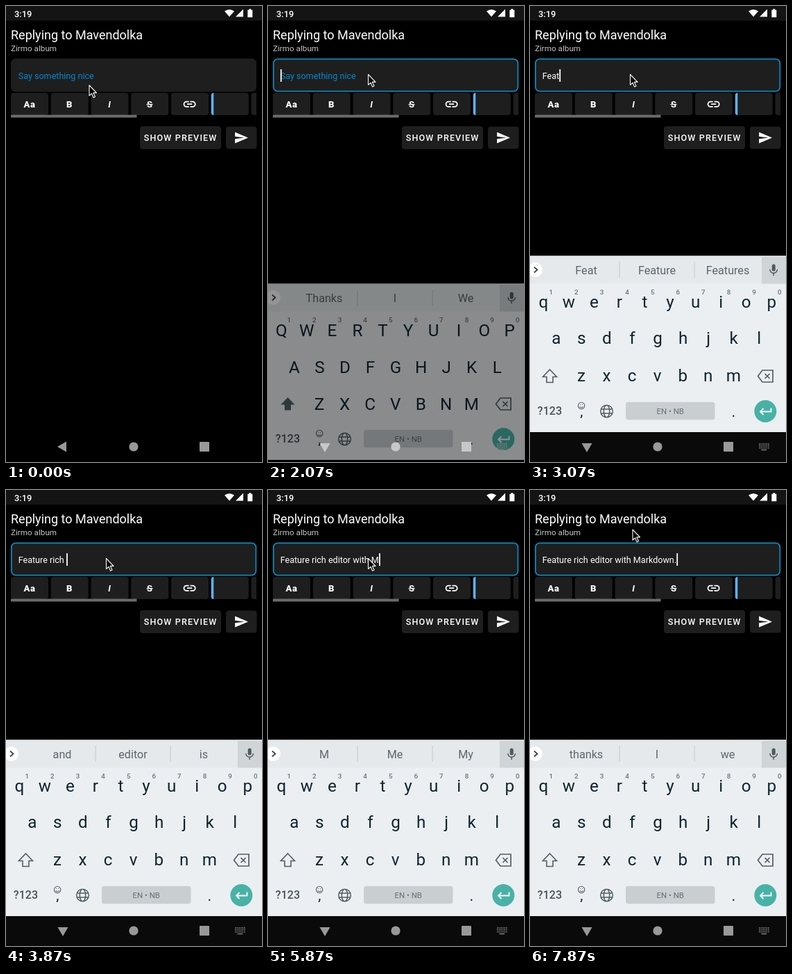
Animation of 369 by 656 pixels, one loop 8000 ms. Source, as an HTML page with a canvas:

```html
<!DOCTYPE html>
<html lang="en">
<head>
<meta charset="utf-8">
<title>Reply editor</title>
<style>
  html, body { margin: 0; width: 100%; height: 100%; overflow: hidden; background: #000; }
  canvas { display: block; width: 369px; height: 656px; }
</style>
</head>
<body>
<canvas id="stage"></canvas>
<script>
const W = 369, H = 656, LOOP = 8000;
const canvas = document.getElementById('stage');
const ctx = canvas.getContext('2d');
const dpr = window.devicePixelRatio || 1;
canvas.width = Math.round(W * dpr);
canvas.height = Math.round(H * dpr);

const FULL = 'Feature rich editor with Markdown.';
// [time, typed characters, suggestions]
const TYPING = [
  [0, 0, 'Thanks|I|We'], [2670, 1, 'Thanks|I|We'], [2730, 1, 'F|For|From'],
  [2870, 2, 'Fe|Few|Feel'], [2930, 3, 'Fea|Fear|Feature'], [3000, 4, 'Feat|Feature|Features'],
  [3130, 5, 'Featu|Feature|Features'], [3200, 6, 'Featur|Feature|Features'],
  [3270, 7, 'Feature|Features|Featured'], [3330, 8, 'is|and|of'],
  [3470, 9, 'r|rich|right'], [3530, 10, 'ri|right|rich'], [3670, 11, 'ric|rich|Richard'],
  [3730, 12, 'rich|rich|riches'], [3870, 13, 'and|editor|is'],
  [4330, 14, 'e|editor|et'], [4530, 15, 'ed|editor|Ed'], [4670, 16, 'edi|editor|edit'],
  [4730, 17, 'edit|editor|editing'], [4870, 18, 'edito|editor|editors'],
  [5000, 19, 'editor|editors|editorial'], [5070, 20, 'and|of|for'],
  [5270, 21, 'w|with|we'], [5330, 22, 'wi|with|wit'], [5470, 23, 'wit|with|without'],
  [5530, 24, 'wit|with|without'], [5600, 24, 'with|within|without'], [5670, 25, 'a|the|my'],
  [5870, 26, 'M|Me|My'], [6000, 27, 'Ma|May|Man'], [6130, 28, 'Mar|Mark|Mary'],
  [6270, 29, 'Mar|Mark|Mary'], [6330, 29, 'Mark|Marks|Market'],
  [6470, 30, 'Markd|Markdown|Markdowns'], [6600, 31, 'Markdo|Markdown|Markdowns'],
  [6800, 32, 'Markdow|Markdown|Markdowns'], [7000, 33, 'Markdown|Markdowns|'],
  [7870, 34, 'thanks|I|we']
];
// [time, x, y]
const POINTER = [[0, 119.5, 113.5], [330, 129, 108], [400, 138, 102], [470, 144, 99], [930, 144, 98], [7730, 147.5, 56.5]];
// [time, offset down, brightness]
const SLIDE = [[2070, 40, .58], [2130, 13, .82], [2200, 0, .975], [2270, 0, 1]];

const at = (list, t) => list.reduce((hit, row) => row[0] <= t ? row : hit, null);

function text(s, x, y, size, color, opt = {}) {
  ctx.font = `${opt.style || ''} ${opt.weight || 400} ${size}px Roboto, sans-serif`;
  ctx.letterSpacing = (opt.space || 0) + 'px';
  ctx.textAlign = opt.align || 'left';
  ctx.fillStyle = color;
  ctx.fillText(s, x, y);
  const w = ctx.measureText(s).width;
  ctx.letterSpacing = '0px';
  return w;
}
const mid = (s, x, y, size, color, opt) => text(s, x, y, size, color, { align: 'center', ...opt });

function rect(x, y, w, h, color, r = 0) {
  ctx.fillStyle = color;
  ctx.beginPath();
  ctx.roundRect(x, y, w, h, r);
  ctx.fill();
}
function disc(x, y, r, color) {
  ctx.fillStyle = color;
  ctx.beginPath();
  ctx.arc(x, y, r, 0, 7);
  ctx.fill();
}
// Path drawn from SVG syntax at a place; a line width makes it an outline.
function icon(d, x, y, scale, color, line) {
  const p = new Path2D(d);
  ctx.save();
  ctx.translate(x, y);
  ctx.scale(scale, scale);
  if (line) {
    ctx.strokeStyle = color;
    ctx.lineWidth = line;
    ctx.stroke(p);
  } else {
    ctx.fillStyle = color;
    ctx.fill(p);
  }
  ctx.restore();
}

function statusBar() {
  rect(0, 0, W, 21, '#141414');
  text('3:19', 12, 15.5, 12.8, '#fff', { weight: 500 });
  icon('M0 3Q7-2 14 3L7 11Z', 315, 4.5, 1, '#fff');
  icon('M11 0V11H0Z', 331, 4.5, 1, '#fff');
  icon('M2 0H5V1.5H7V12H0V1.5H2Z', 348.3, 4.3, 1, '#fff');
}

function toolbar() {
  ctx.save();
  ctx.beginPath();
  ctx.rect(7, 124, 354, 38);
  ctx.clip();
  for (let i = 0; i < 7; i++) rect(7 + i * 57.75, 125, 54, 32, '#1e1e1e', 4);
  ctx.save();
  ctx.beginPath();
  ctx.roundRect(295.5, 125, 54, 32, 4);
  ctx.clip();
  rect(295.5, 125, 3.8, 32, '#5fb2fa');
  ctx.restore();
  mid('Aa', 34, 146, 13, '#fff', { weight: 800, space: .6 });
  mid('B', 91.3, 146, 13, '#fff', { weight: 800 });
  mid('I', 149, 146, 13, '#fff', { weight: 700, style: 'italic' });
  mid('S', 207, 146, 13, '#fff', { weight: 700 });
  rect(202.5, 141, 9, 1.2, '#fff');
  icon('M11 8H7a4 4 0 0 0 0 8h4M13 8h4a4 4 0 0 1 0 8h-4M8 12h8', 253.8, 130.4, .9, '#fff', 2);
  rect(7, 156.5, 181.5, 4, '#6b6b6b');
  ctx.restore();
}

function editor(t, count) {
  const focus = t >= 1870;
  rect(7, 75.5, 354, 48, '#1e1e1e', 7);
  if (focus) {
    ctx.globalAlpha = t < 1930 ? .6 : 1;
    ctx.strokeStyle = '#0b86ba';
    ctx.lineWidth = 1.8;
    ctx.beginPath();
    ctx.roundRect(7.9, 76.4, 352.4, 46.2, 6);
    ctx.stroke();
    ctx.globalAlpha = 1;
  }
  const typed = FULL.slice(0, count);
  let end = 0;
  if (typed) end = text(typed, 17.7, 104.5, 12.57, '#fff');
  else text('Say something nice', 17.7, 104.5, 12.57, '#0288d1');
  const off = t < 1930 || (t >= 2470 && t < 2670) || (t >= 7470 && t < 7870);
  if (!off) rect(17.9 + end, 91, 1.8, 18, '#fff');
}

function page(t, count) {
  text('Replying to Mavendolka', 7, 47.5, 18, '#fff');
  text('Zirmo album', 7, 65, 11.7, '#c4c4c4');
  editor(t, count);
  toolbar();
  rect(193, 173, 117, 33, '#1e1e1e', 4);
  text('SHOW PREVIEW', 198.8, 194, 12.57, '#fff', { weight: 500, space: 1.12 });
  rect(317, 173.5, 44.5, 32, '#1e1e1e', 4);
  icon('M2 21 23 12 2 3V10L17 12 2 14Z', 328.3, 178.7, .9, '#fff');
}

function suggestions(words) {
  rect(0, 359.5, W, 40, '#e5e9eb');
  rect(334, 361, 35, 38.5, '#cfd4d7');
  disc(7.5, 379.5, 10.5, '#fff');
  icon('M6 375.5l4.5 4-4.5 4', 0, 0, 1, '#37474f', 1.8);
  rect(128.6, 368, 1, 23, '#c3c9cc');
  rect(236.6, 368, 1, 23, '#c3c9cc');
  words.split('|').forEach((w, i) => mid(w, 81 + i * 102, 385.5, 16.16, '#5b676d'));
  rect(348.7, 371.5, 5, 10, '#4b5a61', 2.5);
  icon('M345.8 379a5.3 5.3 0 0 0 10.6 0M351.1 384.5v3.5', 0, 0, 1, '#4b5a61', 1.5);
}

function keys(upper) {
  const ink = '#0c2530', soft = '#4f5f66';
  const rows = [['qwertyuiop', 19.3, 435], ['asdfghjkl', 37.8, 487.5], ['zxcvbnm', 74, 541]];
  for (const [letters, x, y] of rows) {
    [...letters].forEach((c, i) => {
      mid(upper ? c.toUpperCase() : c, x + i * 36.55, y - (upper ? 0 : 1.5), 24.2, ink);
    });
  }
  for (let i = 0; i < 10; i++) mid((i + 1) % 10, 30.3 + i * 36.6, 415, 9.8, '#68757b', { weight: 500 });

  const shift = 'M28.5 523 38.5 533.5H33V541.5H24V533.5H18.5Z';
  icon(shift, 0, 0, 1, soft, upper ? 0 : 1.6);
  icon('M335 524H350V541H335L328.5 532.5ZM338.5 529l7 7M345.5 529l-7 7', 0, 0, 1, soft, 1.7);

  text('?123', 10.8, 588.3, 16.1, '#45555c', { weight: 500 });
  icon('M78.8 575a4.7 4.7 0 1 1-9.4 0a4.7 4.7 0 1 1 9.4 0M71.7 576.3q2.4 3 4.8 0M72.2 573.5h1M75 573.5h1', 0, 0, 1, soft, 1.1);
  mid(',', 74.3, 589.5, 21, ink);
  icon('M119.3 583a8.8 8.8 0 1 1-17.6 0a8.8 8.8 0 1 1 17.6 0M114.7 583a4.2 8.8 0 1 1-8.4 0a4.2 8.8 0 1 1 8.4 0M102.5 580h16M102.5 586h16', 0, 0, 1, soft, 1.5);
  rect(138, 569.8, 128.5, 25.5, '#c9ced1', 3.5);
  mid('EN • NB', 202.2, 587, 11.4, '#627076');
  mid('.', 293.3, 590.5, 22, ink);
  disc(339.3, 583, 16, '#48b2a7');
  icon('M347.5 578.5V583.5H332.5M336.5 579l-4.5 4.5 4.5 4.5', 0, 0, 1, '#fff', 1.8);
}

function keyboard(t, words) {
  const pose = at(SLIDE, t);
  if (!pose) return;
  const [, drop, light] = pose;
  ctx.save();
  ctx.translate(0, drop);
  rect(0, 359.5, W, 253.5, '#eceff1');
  suggestions(words);
  keys(t < 2730);
  if (light < 1) rect(0, 359, W, 254.5, `rgba(0,0,0,${1 - light})`);
  ctx.restore();
  if (!drop) rect(0, 613, W, 43, '#0a0a0a');
}

function navBar(t) {
  const color = t >= 2070 && t < 2130 ? '#c8c8c8' : '#999';
  const turn = t < 1930 ? 0 : t < 2000 ? .5 : 1;
  ctx.save();
  ctx.translate(81 + turn, 634 + turn);
  ctx.rotate(-turn * Math.PI / 2);
  icon('M-7 0 6-7.5V7.5Z', 0, 0, 1, color);
  ctx.restore();
  disc(184, 634, 6.6, color);
  rect(279, 627, 14, 14, color, .8);
  if (!turn) return;
  ctx.globalAlpha = turn;
  for (let r = 0; r < 3; r++) {
    for (let i = 0; i < 6; i++) rect(330 + i * 2.6, 629.3 + r * 2.8, 1.6, 1.6, '#808080');
  }
  rect(333.5, 637.8, 7.5, 1.5, '#808080');
  ctx.globalAlpha = 1;
}

function pointer(t) {
  const [, x, y] = at(POINTER, t);
  const d = 'M.5 .5V15.5L4 12.3 6.6 18.2 9 17.1 6.4 11.4H11Z';
  ctx.lineJoin = 'round';
  icon(d, x, y, 1, '#000');
  icon(d, x, y, 1, '#fff', 1.1);
  ctx.lineJoin = 'miter';
}

function draw(t) {
  const [, count, words] = at(TYPING, t);
  ctx.setTransform(dpr, 0, 0, dpr, 0, 0);
  rect(0, 0, W, H, '#000');
  statusBar();
  page(t, count);
  keyboard(t, words);
  navBar(t);
  pointer(t);
}

const start = performance.now();
function tick() {
  draw((performance.now() - start) % LOOP);
  requestAnimationFrame(tick);
}
tick();
</script>
</body>
</html>
```
